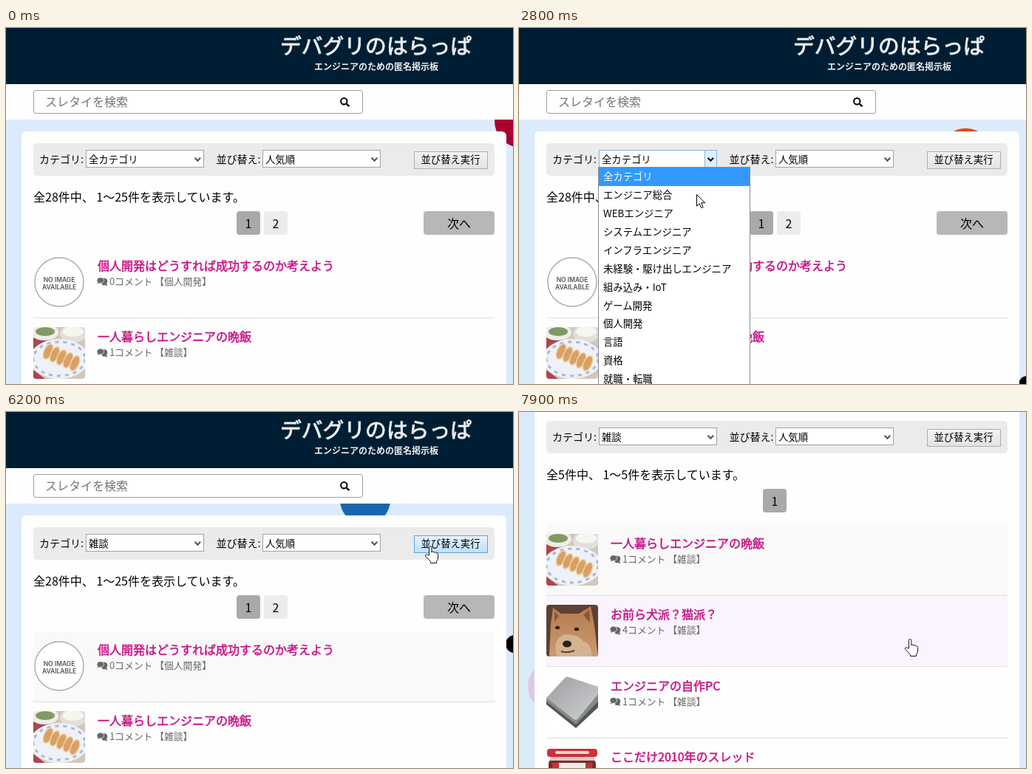
Recreate the animation shown at these times as an HTML page. Size 686x482 px, loop 8000 ms.

```html
<!DOCTYPE html>
<html lang="ja">
<head>
<meta charset="utf-8">
<title>デバグリのはらっぱ</title>
<style>
html, body { margin: 0; width: 100%; height: 100%; overflow: hidden; background: #dbebfc; }
svg { display: block; }
text { font-family: "Noto Sans CJK JP", "Noto Sans CJK", "Noto Sans", sans-serif; font-size: 16px; fill: #000; white-space: pre; }
.mid { text-anchor: middle; }
.label { font-size: 14px; }
.ui { font-size: 13.33px; }
/* a thin outline gives the medium weight */
.head { font-size: 28.8px; fill: #eceff1; stroke: #eceff1; stroke-width: .9px; }
.title { fill: #c71585; stroke: #c71585; stroke-width: .55px; }
.meta { font-size: 12.8px; fill: #666; }
.none { font: 600 8.5px Inter, "Open Sans", sans-serif; fill: #555; }
</style>
</head>
<body>
<svg id="stage" width="686" height="482" viewBox="0 0 686 482">
  <defs>
    <clipPath id="round"><rect width="70" height="70" rx="4"/></clipPath>
    <linearGradient id="plain" x2="0" y2="1"><stop stop-color="#f3f3f3"/><stop offset="1" stop-color="#e2e2e2"/></linearGradient>
    <linearGradient id="lit" x2="0" y2="1"><stop stop-color="#e6f3fd"/><stop offset="1" stop-color="#bfdff8"/></linearGradient>
    <linearGradient id="metal" x2="1" y2="1"><stop stop-color="#9d9ea1"/><stop offset="1" stop-color="#cfd0d2"/></linearGradient>
    <linearGradient id="fur" x2="0" y2="1"><stop stop-color="#b5794d"/><stop offset="1" stop-color="#c99c72"/></linearGradient>

    <g id="blank">
      <circle cx="35" cy="35" r="33" fill="#fff" stroke="#a9a9a9" stroke-width="1.4"/>
      <text class="none mid" x="35" y="34.5">NO IMAGE</text>
      <text class="none mid" x="35" y="44.5">AVAILABLE</text>
    </g>
    <g id="dinner" clip-path="url(#round)">
      <rect width="70" height="70" fill="#d3c6ba"/>
      <path d="M0 10L24 18L0 34zM0 58L16 70H0z" fill="#b0444b"/>
      <ellipse cx="15" cy="7" rx="19" ry="11" fill="#eceee9"/>
      <ellipse cx="16" cy="6" rx="13" ry="6" fill="#7f9a63"/>
      <ellipse cx="54" cy="9" rx="18" ry="12" fill="#e2dfda"/>
      <ellipse cx="54" cy="6" rx="14" ry="7" fill="#f6f5f0"/>
      <ellipse cx="35" cy="43" rx="40" ry="27" fill="#eef1f7"/>
      <ellipse cx="35" cy="43" rx="35" ry="23" fill="none" stroke="#a9b8d8" stroke-width="3" stroke-dasharray="5 6"/>
      <g fill="#d9a064" stroke="#efd3a6" stroke-width="1.5">
        <ellipse cx="20" cy="33" rx="5.5" ry="11" transform="rotate(24 20 33)"/>
        <ellipse cx="29" cy="37" rx="5.5" ry="11" transform="rotate(24 29 37)"/>
        <ellipse cx="38" cy="41" rx="5.5" ry="11" transform="rotate(24 38 41)"/>
        <ellipse cx="47" cy="45" rx="5.5" ry="11" transform="rotate(24 47 45)"/>
        <ellipse cx="56" cy="49" rx="5.5" ry="11" transform="rotate(24 56 49)"/>
      </g>
    </g>
    <g id="dog" clip-path="url(#round)">
      <rect width="70" height="70" fill="#5d4033"/>
      <path d="M4 70L6 26L9 4L20 12H44L60 2L65 28L70 70z" fill="url(#fur)"/>
      <path d="M11 9L17 15L11 23zM58 7L50 14L59 24z" fill="#855639"/>
      <path d="M12 56Q14 42 27 40Q44 40 50 50Q60 50 62 70H14z" fill="#d3b38f"/>
      <ellipse cx="15" cy="31" rx="3" ry="2.2" fill="#2a1a12"/>
      <ellipse cx="41" cy="33" rx="3.2" ry="2.3" fill="#2a1a12"/>
      <ellipse cx="28" cy="53" rx="6" ry="4.5" fill="#2b211d"/>
      <path d="M20 63Q28 66 38 62" fill="none" stroke="#5b4031" stroke-width="2"/>
    </g>
    <g id="chip" clip-path="url(#round)">
      <rect width="70" height="70" fill="#fff"/>
      <path d="M0 32V38L40 70L70 42V22z" fill="#4f584d"/>
      <path d="M0 30V34L40 65L70 34V20z" fill="#86888b"/>
      <path d="M0 29L26 1Q28 0 31 1L70 14V24L42 58Q40 60 37 58z" fill="url(#metal)"/>
    </g>
    <g id="jar" clip-path="url(#round)">
      <rect width="70" height="70" fill="#fff"/>
      <rect x="3" y="16" width="64" height="60" rx="6" fill="#7d2a22"/>
      <rect x="1" y="2" width="68" height="11" rx="4" fill="#cf2f38"/>
      <rect x="12" y="5" width="46" height="4" rx="2" fill="#eed3cf"/>
      <rect x="5" y="13" width="60" height="5" fill="#d5c9c4"/>
      <rect x="8" y="21" width="54" height="50" fill="#f1ece6"/>
      <path d="M8 21H17V70H8zM53 21H62V70H53z" fill="#c4333a"/>
    </g>
    <g id="talk" fill="#666">
      <path d="M5.4 3.5a4.6 3.8 0 0 1 8.5 3.2q0 1.4-.9 2.4l1.5 2.4q-2 .2-3.3-1q-2 .8-4-.3z"/>
      <path d="M5.4.2a5 4 0 1 1-1.8 7.9Q2 9.4 0 9.1L1.4 7A5 4 0 0 1 5.4.2z" stroke="#fff" stroke-width=".7"/>
    </g>
  </defs>

  <rect width="686" height="482" fill="#dbebfc"/>
  <g id="page">
    <g id="marks"></g>
    <rect width="686" height="76" fill="#001e33"/>
    <text class="head mid" x="500.5" y="35.4">デバグリのはらっぱ</text>
    <text class="mid" x="501" y="56.6" style="font-size:12px;font-weight:700;fill:#eceff1">エンジニアのための匿名掲示板</text>
    <rect y="76" width="686" height="48" fill="#fefefe"/>
    <rect x="37.5" y="84.5" width="445" height="31" rx="2.5" fill="#fff" stroke="#a0a0a0"/>
    <text x="53" y="106" style="fill:#757575;font-weight:300">スレタイを検索</text>
    <path d="M461 103L464.5 106.2" stroke="#000" stroke-width="2.4"/>
    <circle cx="457.3" cy="99.2" r="4.2" fill="none" stroke="#000" stroke-width="2"/>

    <rect x="21" y="140" width="656" height="900" rx="6" fill="#fefefe"/>
    <rect x="37" y="156" width="624" height="44" rx="5" fill="#ebebeb"/>
    <text class="label" x="45" y="183.2">カテゴリ:</text>
    <text class="label" x="284.5" y="183.2">並び替え:</text>
    <rect id="box" x="108.5" y="165.5" width="159" height="23" fill="#fff" stroke="#a3a3a3"/>
    <rect id="drop" x="251.5" y="165.5" width="16" height="23" fill="#e0eefb" stroke="#7eb4ea"/>
    <text id="choice" class="ui" x="112" y="183"></text>
    <rect x="347.5" y="165.5" width="159" height="23" fill="#fff" stroke="#a3a3a3"/>
    <text class="ui" x="351" y="183">人気順</text>
    <path id="tick" d="M255.5 175.8L259.3 179.8L263.1 175.8" fill="none" stroke-width="2"/>
    <path d="M494.7 175.8L498.5 179.8L502.3 175.8" fill="none" stroke="#46584f" stroke-width="2"/>
    <rect id="button" x="552.5" y="167.5" width="99" height="23"/>
    <text class="ui mid" x="601.5" y="183.4">並び替え実行</text>

    <g id="all">
      <text x="37" y="235">全28件中、 1〜25件を表示しています。</text>
      <rect x="312" y="248" width="32" height="32" rx="4" fill="#a9a9a9"/>
      <rect x="349" y="248" width="32" height="32" rx="4" fill="#ececec"/>
      <rect x="565" y="248" width="96" height="32" rx="4" fill="#b8b7b6"/>
      <text class="mid" x="328" y="271">1</text>
      <text class="mid" x="365" y="271">2</text>
      <text class="mid" x="613" y="271">次へ</text>
    </g>
    <g id="few">
      <text x="37" y="235">全5件中、 1〜5件を表示しています。</text>
      <rect x="330" y="248" width="32" height="32" rx="4" fill="#a9a9a9"/>
      <text class="mid" x="346" y="271">1</text>
    </g>
    <g id="menu">
      <rect x="107.5" y="188.5" width="205" height="400" fill="#fff" stroke="#8a8a8a"/>
      <rect id="pick" x="108" width="204" height="25" fill="#3399ff"/>
    </g>
  </g>
  <path id="arrow" d="M.5 .5V16.2L4.1 12.8L6.6 18.6L9.1 17.5L6.6 11.8H11.6z" fill="#fff" stroke="#000"/>
  <path id="hand" d="M-1.5 13V2.5Q-1.5 .6 .2 .6T1.9 2.5V9Q2.1 7.7 3.6 7.9T5.2 9.5Q5.5 8.4 6.8 8.7T8.2 10.3Q8.6 9.5 9.5 9.8T10.6 11.5V16Q10.6 19 8.6 21V23.5H.4V21.4L-6 14.6Q-7.2 12.4 -5.7 11.9T-3.4 12.5z" fill="#fff" stroke="#111827"/>
</svg>
<script>
const LOOP = 8000, STEP = 100, ROW = 96.4, TOP = 296, RISE = 0.0496;
const OPEN = 2100, CLOSE = 5200, RELOAD = 6600;
const $ = id => document.getElementById(id);
const show = (el, on) => { el.style.display = on ? "" : "none"; };
const set = (el, attrs) => { for (const k in attrs) el.setAttribute(k, attrs[k]); };
function add(parent, tag, attrs, text = "") {
  const el = document.createElementNS("http://www.w3.org/2000/svg", tag);
  set(el, attrs);
  el.textContent = text;
  return parent.appendChild(el);
}

// threads: picture, title, comments, category
const dinner = ["dinner", "一人暮らしエンジニアの晩飯", 1, "雑談"];
const lists = {
  all: [["blank", "個人開発はどうすれば成功するのか考えよう", 0, "個人開発"], dinner],
  few: [dinner, ["dog", "お前ら犬派？猫派？", 4, "雑談"], ["chip", "エンジニアの自作PC", 1, "雑談"],
    ["jar", "ここだけ2010年のスレッド", 2, "雑談"]]
};
const rows = {};
for (const id in lists) rows[id] = lists[id].map(([pic, title, count, tag], i) => {
  const y = TOP + ROW * i, g = $(id);
  const back = add(g, "rect", { x: 37, y: Math.round(y) + 1, width: 624, height: 95 });
  add(g, "rect", { x: 37, y: Math.round(y + 96), width: 624, height: 1, fill: "#dedfd8" });
  add(g, "use", { href: "#" + pic, x: 37, y: Math.round(y + 13) });
  add(g, "text", { class: "title", x: 124, y: y + 32 }, title);
  add(g, "use", { href: "#talk", x: 123, y: y + 41.5 });
  add(g, "text", { class: "meta", x: 140, y: y + 51.8 }, `${count}コメント 【${tag}】`);
  return back;
});

const items = ["全カテゴリ", "エンジニア総合", "WEBエンジニア", "システムエンジニア", "インフラエンジニア",
  "未経験・駆け出しエンジニア", "組み込み・IoT", "ゲーム開発", "個人開発", "言語", "資格", "就職・転職"]
  .map((s, i) => add($("menu"), "text", { class: "ui", x: 114, y: 206.2 + 24.9 * i }, s));

// drifting marks: x, y at time 0, radius, colour, square?
const marks = [
  [697, 126, 36, "#a80030"],
  [283.5, 193.8, 34.5, "#0769ad", true],
  [604.5, 310.7, 36, "#e2480f"],
  [688, 621.7, 12, "#000"],
  [486, 426.5, 34, "#1a66ad"],
  [48, 907, 36, "#dccae3"]
].map(([x, y, r, fill, square]) => ({
  y,
  el: square
    ? add($("marks"), "rect", { x: x - r, y: -r, width: 2 * r, height: 2 * r, fill })
    : add($("marks"), "circle", { cx: x, r, fill })
}));

// pointer: time, x, y
const path = [
  [0, 700, 66], [700, 690, 72], [800, 670, 80], [900, 653, 89], [1000, 628, 92], [1100, 563, 113],
  [1400, 400, 160], [1700, 256, 185], [1800, 247, 187], [2700, 247, 187], [2800, 240, 225],
  [2900, 235, 248], [3200, 213, 392], [3300, 203, 422], [3500, 198, 500], [5100, 190, 500],
  [5300, 191, 400], [5400, 194, 338], [5800, 443, 245], [5900, 508, 214], [6000, 556, 218],
  [6100, 574, 181], [7100, 574, 181], [7400, 529, 307], [LOOP, 529, 307]
];
function pointer(t) {
  const i = Math.max(1, path.findIndex(p => p[0] >= t));
  const [t0, x0, y0] = path[i - 1], [t1, x1, y1] = path[i];
  const k = (t - t0) / (t1 - t0);
  return [x0 + (x1 - x0) * k, y0 + (y1 - y0) * k];
}

function scrollAt(t) {
  const k = Math.min(1, Math.max(0, (t - 7500) / 400));
  return Math.round(144 * k * k * (3 - 2 * k));
}

function draw(t) {
  const [x, y] = pointer(t), scroll = scrollAt(t);
  const open = t >= OPEN && t < CLOSE, fresh = t >= RELOAD;
  const inside = (l, u, r, b) => x >= l && x <= r && y >= u && y <= b;
  set($("page"), { transform: `translate(0 ${-scroll})` });

  const drift = fresh ? t : Math.min(t, 6400);
  marks.forEach((m, i) => {
    show(m.el, fresh === (i === marks.length - 1));
    set(m.el, { transform: `translate(0 ${m.y - RISE * drift})` });
  });

  const active = open || inside(108, 165, 268, 189);
  set($("box"), { stroke: active ? "#7eb4ea" : "#a3a3a3" });
  set($("tick"), { stroke: active ? "#000" : "#46584f" });
  show($("drop"), active);
  $("choice").textContent = t < CLOSE ? "全カテゴリ" : "雑談";
  const press = inside(552, 167, 652, 191);
  set($("button"), { fill: press ? "url(#lit)" : "url(#plain)", stroke: press ? "#5aa5e0" : "#adadad" });

  show($("menu"), open);
  if (open) {
    // the highlight trails the pointer by one step
    const n = Math.max(0, Math.floor((pointer(t - STEP)[1] - 188.5) / 24.9));
    show($("pick"), n < items.length);
    set($("pick"), { y: Math.round(188.8 + 24.9 * n) });
    items.forEach((el, i) => { el.style.fill = i === n ? "#fff" : "#000"; });
  }

  show($("all"), !fresh);
  show($("few"), fresh);
  const over = Math.floor((y + scroll - TOP) / ROW);
  rows.all.forEach((el, i) => set(el, { fill: t >= 5400 && i === 0 ? "#f9f9f9" : "none" }));
  rows.few.forEach((el, i) => set(el, { fill: i === over ? "#faf4ff" : i < over ? "#f9f9f9" : "none" }));

  const link = press || (t >= CLOSE && y >= TOP);
  const at = { transform: `translate(${Math.round(x)} ${Math.round(y)})` };
  show($("arrow"), !link);
  show($("hand"), link);
  set($("arrow"), at);
  set($("hand"), at);
}

const start = performance.now();
function tick() {
  const t = (performance.now() - start) % LOOP;
  draw(Math.floor(t / STEP) * STEP);
  requestAnimationFrame(tick);
}
tick();
</script>
</body>
</html>
```
